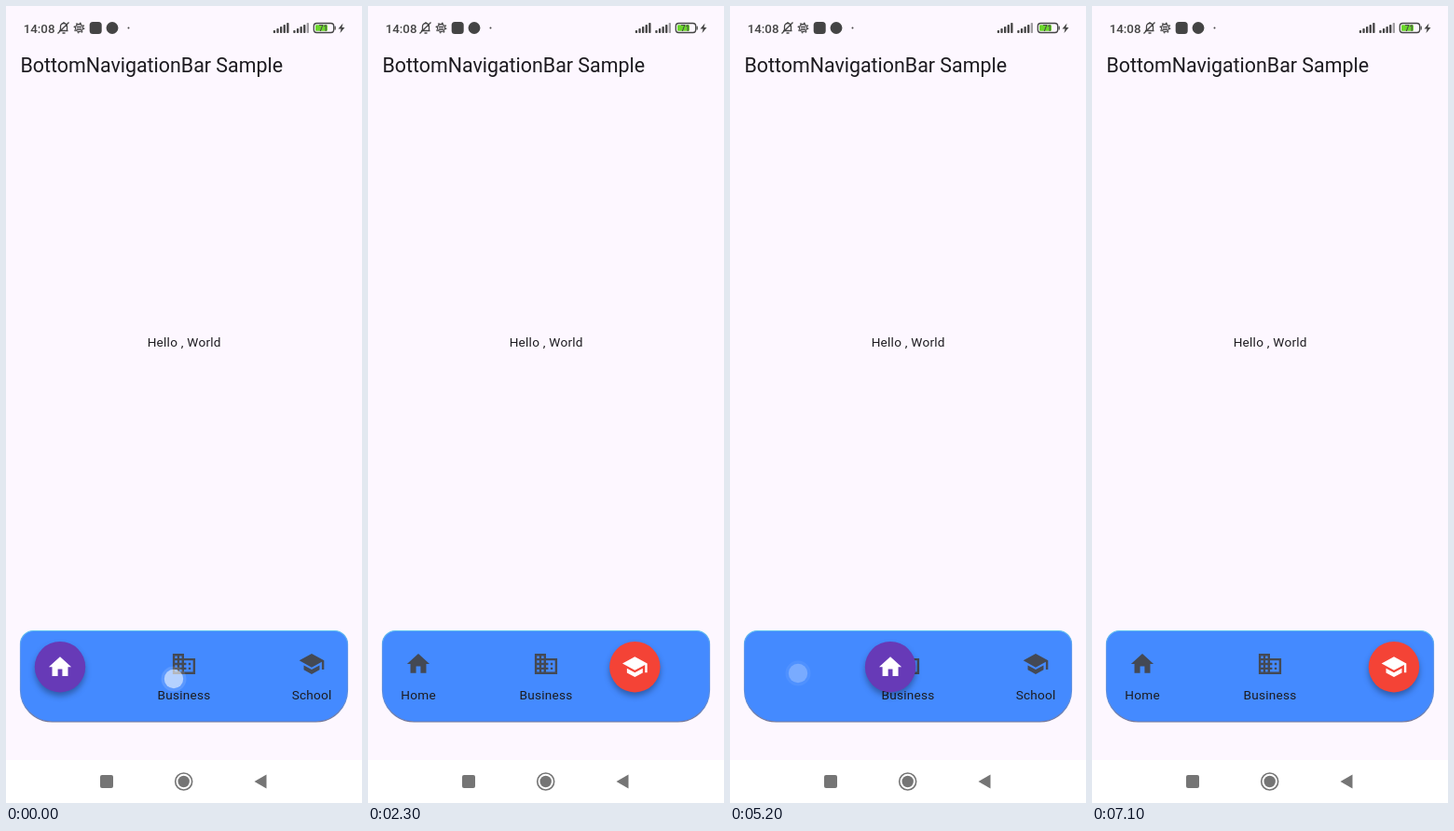
Animation, 382 px wide and 854 px high, one loop 7600 ms. Source, as an HTML page:

```html
<!DOCTYPE html>
<html lang="en">
<head>
<meta charset="utf-8">
<title>Bottom navigation</title>
<style>
  html, body { margin: 0; width: 100%; height: 100%; overflow: hidden; background: #fdf7ff; }
  svg { display: block; width: 100vw; height: 100vh; font-family: Roboto, sans-serif; }
  .body { font-size: 13.6px; letter-spacing: .24px; fill: #1d1b20; }
  .mid { text-anchor: middle; }
  .icon { fill: #444954; }
  .status { fill: #444; }
  .line { fill: none; stroke: #444; stroke-width: 1.3; }
  .key { fill: #757575; }
  #ball .disc { filter: drop-shadow(0 4px 3px rgba(0, 0, 0, .32)); }
  #ball use { fill: #fff; }
</style>
</head>
<body>
<svg viewBox="0 0 382 854">
  <defs>
    <linearGradient id="rim" x1="0" y1="0" x2="0" y2="1">
      <stop offset="0" stop-color="#62c4ee"/>
      <stop offset=".2" stop-color="#5b95ee"/>
      <stop offset=".75" stop-color="#5b8cdc"/>
      <stop offset="1" stop-color="#77799a"/>
    </linearGradient>
    <g id="home"><path transform="scale(1.21) translate(-12 -12)" d="M10 20v-6h4v6h5v-8h3L12 3 2 12h3v8z"/></g>
    <g id="business"><path transform="scale(1.21) translate(-12 -12)" d="M12 7V3H2v18h20V7H12zM6 19H4v-2h2v2zm0-4H4v-2h2v2zm0-4H4V9h2v2zm0-4H4V5h2v2zm4 12H8v-2h2v2zm0-4H8v-2h2v2zm0-4H8V9h2v2zm0-4H8V5h2v2zm10 12h-8v-2h2v-2h-2v-2h2v-2h-2V9h8v10zm-2-8h-2v2h2v-2zm0 4h-2v2h2v-2z"/></g>
    <g id="school"><path transform="scale(1.21) translate(-12 -12)" d="M5 13.18v4L12 21l7-3.82v-4L12 17l-7-3.82zM12 3L1 9l11 6 9-4.91V17h2V9L12 3z"/></g>
  </defs>

  <rect width="382" height="854" fill="#fdf7ff"/>

  <!-- status bar -->
  <text class="status" x="18.7" y="28.5" font-size="13.3" font-weight="500">14:08</text>
  <path class="line" d="M57 26.5h9.500M58.500 26v-4a3.500 3.500 0 0 1 7 0v4M62 17v1.500M60.500 29h3M55.500 29.500L67.500 17.500"/>
  <circle class="line" cx="78.500" cy="23.500" r="4"/>
  <circle class="line" cx="78.500" cy="23.500" r="5.300" stroke-dasharray="1.600 2.560"/>
  <path class="line" d="M76 22.500h5M76 25h5" stroke-width="1"/>
  <rect class="status" x="89.700" y="17" width="13" height="13" rx="3.500"/>
  <circle class="status" cx="114" cy="23.500" r="6.400"/>
  <circle class="status" cx="131.500" cy="23.500" r="1"/>
  <g id="signal" class="status"></g>
  <rect x="330.300" y="18.500" width="21.400" height="10" rx="3" class="line" stroke-width="1.100"/>
  <rect x="332" y="20.200" width="13" height="6.600" rx="1" fill="#6bd62c"/>
  <text class="status mid" x="340.500" y="26.700" font-size="8.500" font-weight="500">71</text>
  <rect class="status" x="352.500" y="21.500" width="1.300" height="4" rx=".6"/>
  <path class="status" d="M361.500 18.500L356.500 24.500h3l-1 4.500 5-6h-3z"/>

  <text x="15.400" y="71" font-size="21.400" fill="#1d1b20">BottomNavigationBar Sample</text>
  <text class="body mid" x="191.200" y="365">Hello , World</text>

  <!-- navigation panel -->
  <path d="M29.500 669.500H352.500a14 14 0 0 1 14 14V733a34 34 0 0 1 -34 34H49.500a34 34 0 0 1 -34 -34V683.500a14 14 0 0 1 14 -14z" fill="#448aff" stroke="url(#rim)" stroke-width="1.200"/>
  <g id="tabs"></g>
  <g id="ball">
    <circle class="disc" r="27.200"/>
    <use/>
  </g>
  <g id="touch" fill="#fff">
    <circle r="13.500" opacity=".13"/>
    <circle r="10.200" opacity=".55"/>
  </g>

  <!-- system keys -->
  <rect y="808" width="382" height="46" fill="#fff"/>
  <rect class="key" x="101" y="824" width="14" height="14" rx="2"/>
  <circle cx="190.700" cy="831" r="9" fill="none" stroke="#757575" stroke-width="1.600"/>
  <circle class="key" cx="190.700" cy="831" r="6.200"/>
  <path class="key" d="M266.500 831L279.500 823.500V838.500z"/>
</svg>
<script>
const LOOP = 7600, STEP = 100, MOVE = 500, FADE = 180;

const tabs = [
  { icon: 'home', label: 'Home', x: 54, stop: 58, color: '#673ab7' },
  { icon: 'business', label: 'Business', x: 191, stop: 191, color: '#ff9800' },
  { icon: 'school', label: 'School', x: 328, stop: 324, color: '#f44336' }
];

// press: finger down, lift: finger up and the ball starts to move
const taps = [
  { press: 0, lift: 130, to: 1, x: 180, y: 721 },
  { press: 1900, lift: 1961, to: 2, x: 328, y: 711 },
  { press: 3700, lift: 3840, to: 1, x: 184, y: 714 },
  { press: 4900, lift: 5105, to: 0, x: 73, y: 715 },
  { press: 6300, lift: 6305, to: 2, x: 331, y: 706 }
];

const $ = s => document.querySelector(s);
const ball = $('#ball'), disc = $('#ball .disc'), glyph = $('#ball use'), touch = $('#touch');

const bar = (x, h, dim) =>
  `<rect x="${x}" y="${29 - h}" width="2.3" height="${h}" rx=".8" opacity="${dim ? .5 : 1}"/>`;
$('#signal').innerHTML = [286.8, 308.3].map((x, set) =>
  [0, 1, 2, 3, 4].map(i => bar(x + i * 3.6, 3 + i * 2, set && i > 3)).join('')).join('');

$('#tabs').innerHTML = tabs.map(t => `<g>
  <use class="icon" href="#${t.icon}" x="${t.x}" y="705"/>
  <text class="body mid" x="${t.x + .1}" y="743">${t.label}</text></g>`).join('');
const tabNodes = [...$('#tabs').children];

const clamp = v => Math.min(1, Math.max(0, v));
const ease = p => (p + p * p * (3 - 2 * p)) / 2;
const place = (node, x, y) => node.setAttribute('transform', `translate(${x} ${y})`);

function draw(t) {
  let from = 0, current = 0, p = 1, alpha = 0;
  for (const tap of taps) {
    if (t < tap.press) break;
    alpha = 1 - clamp((t - tap.lift) / FADE);
    place(touch, tap.x, tap.y);
    if (t < tap.lift) break;
    from = current;
    current = tap.to;
    p = ease(clamp((t - tap.lift) / MOVE));
  }
  const a = tabs[from].stop, tab = tabs[current];
  place(ball, a + (tab.stop - a) * p, 708.2);
  disc.setAttribute('fill', tab.color);
  glyph.setAttribute('href', '#' + tab.icon);
  tabNodes.forEach((node, i) => node.setAttribute('visibility', i === current ? 'hidden' : 'visible'));
  touch.setAttribute('opacity', alpha);
}

const start = performance.now();
function tick() {
  const t = (performance.now() - start) % LOOP;
  draw(Math.floor(t / STEP) * STEP);
  requestAnimationFrame(tick);
}
tick();
</script>
</body>
</html>
```
